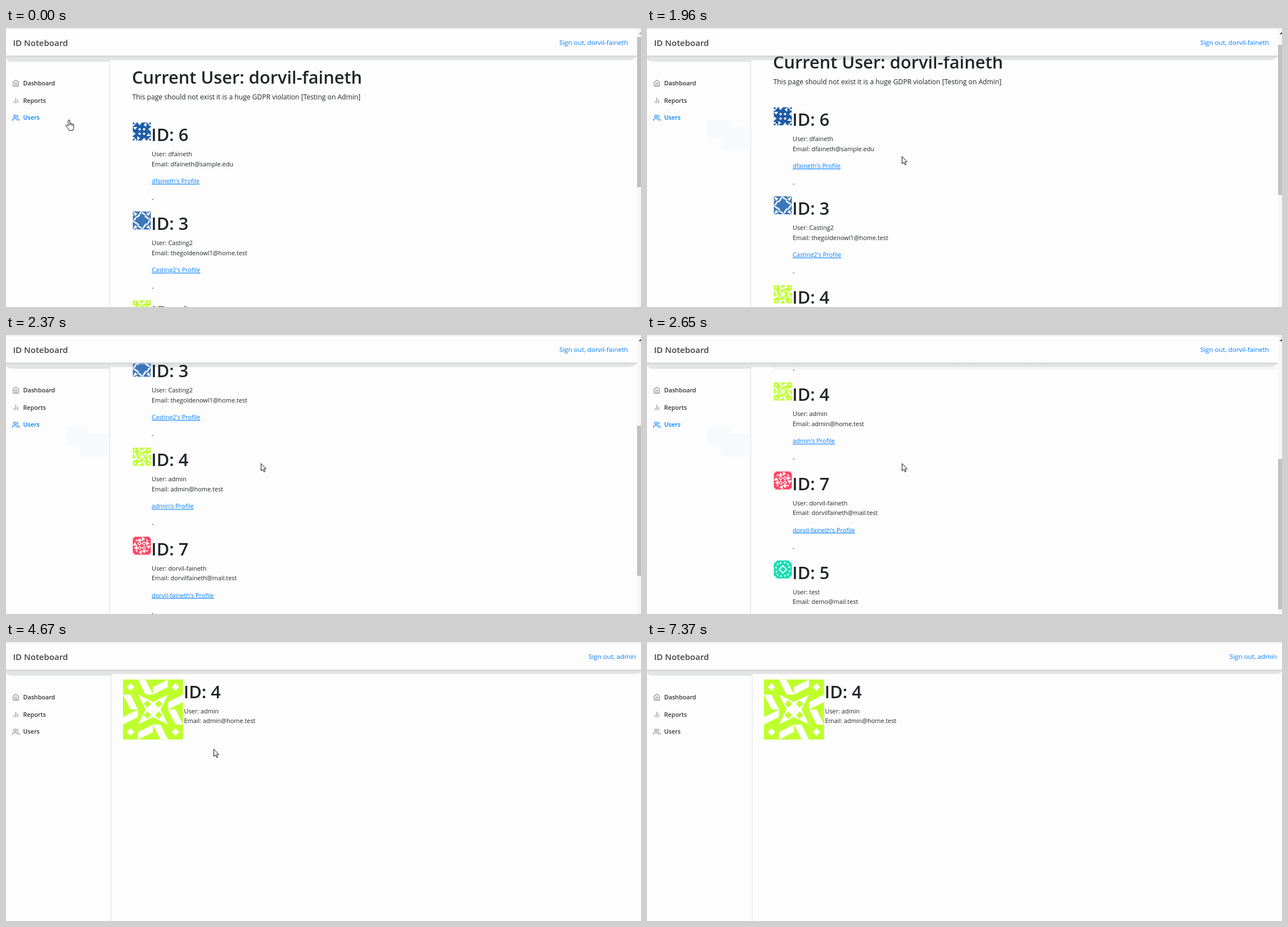
Write an HTML page that moves like this. It is 1129x496 px and loops after 7940 ms.

```html
<!DOCTYPE html>
<html lang="en">
<head>
<meta charset="utf-8">
<title>ID Noteboard</title>
<style>
  html, body { margin: 0; width: 100%; height: 100%; overflow: hidden; background: #fdfdfd; }
  svg { display: block; }
  text { font: 10.9px "Open Sans", "Noto Sans", sans-serif; fill: #212529; }
  .brand { font-size: 15px; font-weight: 600; fill: #444; }
  .title { font-size: 30.8px; font-weight: 600; }
  .lead { font-size: 12.1px; }
  .nav { font-size: 10.75px; font-weight: 600; fill: #333; }
  .account { font-size: 11.6px; fill: #007bff; text-anchor: end; }
  .link { fill: #007bff; text-decoration: underline; }
  .link.hover { fill: #0a5fd0; }
  .icon { fill: none; stroke: #808080; stroke-width: 2; stroke-linecap: round; stroke-linejoin: round; }
  .active .nav { fill: #007bff; }
  .active .icon { stroke: #007bff; }
  .cursor { fill: #fff; stroke: #111; stroke-linejoin: round; }
</style>
</head>
<body>
<svg id="stage" width="1129" height="496" viewBox="0 0 1129 496"></svg>
<script>
const LOOP = 7940;
const PITCH = 158.2;
const PROFILE_AT = 4140;

// time, left, top, kind
const cursorSteps = [
  [0, 106, 163, 'hand'], [130, 131, 176, 'hand'], [280, 169, 196, 'hand'],
  [410, 207, 216, 'arrow'], [540, 234, 228, 'arrow'], [700, 300, 232, 'arrow'],
  [820, 370, 235, 'arrow'], [950, 425, 234, 'arrow'], [1090, 445, 231, 'arrow'],
  [1220, 453, 228, 'arrow'], [2780, 428, 250, 'arrow'], [2920, 405, 241, 'arrow'],
  [3050, 378, 230, 'arrow'], [3190, 353, 208, 'arrow'], [3350, 332, 188, 'arrow'],
  [3490, 320, 178, 'hand'], [3610, 318, 175, 'hand'], [PROFILE_AT, 325, 177, 'arrow'],
  [4380, 336, 181, 'arrow'], [4540, 351, 184, 'arrow'], [4670, 369, 190, 'arrow'],
  [4830, 395, 200, 'arrow'], [4950, 426, 217, 'arrow'], [5090, 446, 228, 'arrow'],
  [5230, 461, 240, 'arrow'], [5350, 474, 252, 'arrow'], [6060, 478, 255, 'arrow'],
  [6200, 490, 266, 'arrow'], [6330, 512, 287, 'arrow'], [6460, 536, 313, 'arrow'],
  [6600, 572, 337, 'arrow'], [6720, 670, 383, 'arrow'], [6850, 795, 417, 'arrow'],
  [6970, 885, 445, 'arrow'], [7090, 973, 465, 'arrow'], [7240, 1049, 481, 'arrow'],
  [7370, 0, 0, 'none']
];
const scrollSteps = [
  [0, 0], [1960, 27], [2090, 81], [2220, 190], [2370, 284],
  [2500, 352], [2650, 400], [2780, 416.5]
];

// White shapes of one quadrant, each in a 4 x 4 cell
const patterns = {
  6: { color: '#1f5da8', corner: 'M0 1.5H1.5V3H0zM1.5 0H3V1.5H1.5z', side: 'M0 0H4L2 2.5z', core: 'M2 .7 3.3 2 2 3.3 .7 2z' },
  3: { color: '#3a76b8', corner: 'M0 0 4 2 2 4zM0 2 1 4H0z', side: 'M0 4 3 0H4L2 4z', core: 'M0 0H2L0 2z' },
  4: { color: '#beff2c', corner: 'M2 1 3 2 2 3 1 2z', side: 'M0 0H2L4 4H2z',
       core: 'M0 0 4 2V4H2zM2.5 1.5 3.5 2.5 2.5 3.5 1.5 2.5z' },
  7: { color: '#ff4564', corner: 'M0 0H2L0 2zM2 4 4 2V4z', side: 'M0 4 2 1 4 4z', core: 'M2 0 4 2 2 4 0 2zM2 1 3 2 2 3 1 2z' },
  5: { color: '#16ddb2', corner: 'M0 0H3L0 3zM2 4 4 2V4z', side: 'M1 3 2 1 3 3z', core: 'M0 4 4 0V1.5L1.5 4z' }
};
const users = [
  [6, 'dfaineth', 'dfaineth@sample.edu'],
  [3, 'Casting2', 'thegoldenowl1@home.test'],
  [4, 'admin', 'admin@home.test'],
  [7, 'dorvil-faineth', 'dorvilfaineth@mail.test'],
  [5, 'test', 'demo@mail.test']
];
const navItems = [
  ['Dashboard', 'M3 9l9-7 9 7v11a2 2 0 0 1-2 2H5a2 2 0 0 1-2-2zM9 22V12h6v10'],
  ['Reports', 'M18 20V10M12 20V4M6 20v-6'],
  ['Users', 'M17 21v-2a4 4 0 0 0-4-4H5a4 4 0 0 0-4 4v2M13 7a4 4 0 1 1-8 0 4 4 0 0 1 8 0M23 21v-2a4 4 0 0 0-3-3.87M16 3.13a4 4 0 0 1 0 7.75']
];

const text = (x, y, content, cls = '') => `<text x="${x}" y="${y}" class="${cls}">${content}</text>`;
const rect = (x, y, w, h, fill, extra = '') =>
  `<rect x="${x}" y="${y}" width="${w}" height="${h}" fill="${fill}" ${extra}/>`;

function avatar(id, x, y, size) {
  const { color, corner, side, core } = patterns[id];
  const cell = (cx, cy, d) => `<path transform="translate(${cx * 4} ${cy * 4})" d="${d}"/>`;
  const quadrant = cell(0, 0, corner) + cell(1, 0, side) + cell(0, 1, side) + cell(1, 1, core);
  const turns = [0, 90, 180, 270].map(a => `<g transform="rotate(${a} 8 8)">${quadrant}</g>`).join('');
  return `<g transform="translate(${x} ${y}) scale(${size / 16})" fill="#fdfdfd" fill-rule="evenodd">
    ${rect(0, 0, 16, 16, color)}${turns}</g>`;
}

function details(x, y, [id, name, email]) {
  return text(x - 0.7, y, `ID: ${id}`, 'title') + text(x, y + 27, `User: ${name}`) +
    text(x, y + 44.5, `Email: ${email}`);
}

function card(user, i) {
  const y = 168 + i * PITCH;
  return avatar(user[0], 225.5, y, 32) + details(259, y + 33, user) +
    text(259, y + 108, `${user[1]}'s Profile`, `link u${user[0]}`) + text(259, y + 139, '-');
}

function sidebar(active) {
  return navItems.map(([label, d], i) => {
    const y = 91.6 + i * 30.8;
    return `<g class="${label === active ? 'active' : ''}">
      <path class="icon" transform="translate(11 ${y}) scale(.54)" d="${d}"/>${text(30.5, y + 10.1, label, 'nav')}</g>`;
  }).join('');
}

// Rounded grey strips under the header, and the sidebar border
function frame(divider, right) {
  return `<path fill="#e3e4e5" d="M0 44V54Q2 60 12 60H${divider}V57H${right - 14}Q${right - 2} 56 ${right} 47V44z"/>` +
    rect(divider, 49, 1, 447, '#dedfe0');
}

function header(right, account, anchor) {
  return rect(0, 0, 1129, 49, '#fdfdfd') + rect(0, 1, 1129, 1, '#e2e2e2') +
    rect(0, 49, right, 4, 'url(#shade)') +
    text(12.5, 31.5, 'ID Noteboard', 'brand') + text(anchor, 30, `Sign out, ${account}`, 'account');
}

const stage = document.getElementById('stage');
stage.innerHTML = `
  <defs><linearGradient id="shade" x2="0" y2="1">
    <stop stop-color="#d2d3d4"/><stop offset="1" stop-color="#d2d3d4" stop-opacity="0"/>
  </linearGradient></defs>
  <g id="list">
    ${rect(107, 163, 39, 33, '#f8f9fb', 'id="trailA"')}
    ${rect(131, 176, 53, 40, '#f8f9fb', 'id="trailB"')}
    ${frame(184, 1122)}
    ${rect(225, 57, 895, 4.5, '#f4f4f5', 'id="band"')}
    <g id="content">
      ${text(224, 99, 'Current User: dorvil-faineth', 'title')}
      ${text(224.5, 126.5, 'This page should not exist it is a huge GDPR violation [Testing on Admin]', 'lead')}
      ${users.map(card).join('')}
    </g>
    ${header(1122, 'dorvil-faineth', 1106)}
    ${sidebar('Users')}
    ${rect(1122, 2, 7, 494, '#f7f7f7')}
    <path id="up" d="M1124.5 11 1129 7V11z"/>
    ${rect(1122, 16, 7, 267, '#c1c1c1', 'id="thumb"')}
  </g>
  <g id="profile">
    ${frame(186.5, 1133)}
    ${avatar(4, 208, 66.7, 106.7)}
    ${details(316.5, 99.5, users[2])}
    ${header(1129, 'admin', 1120)}
    ${sidebar()}
  </g>
  <path id="arrow" class="cursor" d="M.5.5V13.5L3.5 10.7 5.6 15.4 7.6 14.5 5.5 10H9.5z"/>
  <path id="hand" class="cursor" d="M4.5 11.2V2a1.5 1.5 0 0 1 3 0V7a1.4 1.4 0 0 1 2.6.5 1.4 1.4 0 0 1 2.4.7 1.2 1.2 0 0 1 2 1V13.5c0 2-1.5 3-1.5 5.5H6C6 16 1 13 .8 10.8c0-1.5 2-1.5 3.7.4zM7.5 7v3M10.1 7.5v3M12.5 8.3v2.4"/>`;

const $ = id => document.getElementById(id);
const show = (id, on) => $(id).setAttribute('visibility', on ? 'visible' : 'hidden');
const move = (id, x, y) => $(id).setAttribute('transform', `translate(${x} ${y})`);
const stepAt = (steps, t) => steps.findLast(step => step[0] <= t);
const hoverLink = stage.querySelector('.u4');

function draw() {
  const t = performance.now() % LOOP;
  const [, scroll] = stepAt(scrollSteps, t);
  const [, x, y, kind] = stepAt(cursorSteps, t);

  show('list', t < PROFILE_AT);
  show('profile', t >= PROFILE_AT);
  $('trailA').setAttribute('opacity', +(t >= 130));
  $('trailB').setAttribute('opacity', +(t >= 280));
  $('band').setAttribute('opacity', +(t >= 2500));
  $('up').setAttribute('fill', scroll ? '#444' : '#a3a3a3');
  move('content', 0, -scroll);
  move('thumb', 0, scroll * 213 / 416.5);
  hoverLink.classList.toggle('hover', t >= 3490 && t < PROFILE_AT);

  for (const id of ['arrow', 'hand']) {
    show(id, id === kind);
    move(id, x, y);
  }
  requestAnimationFrame(draw);
}
draw();
</script>
</body>
</html>
```
